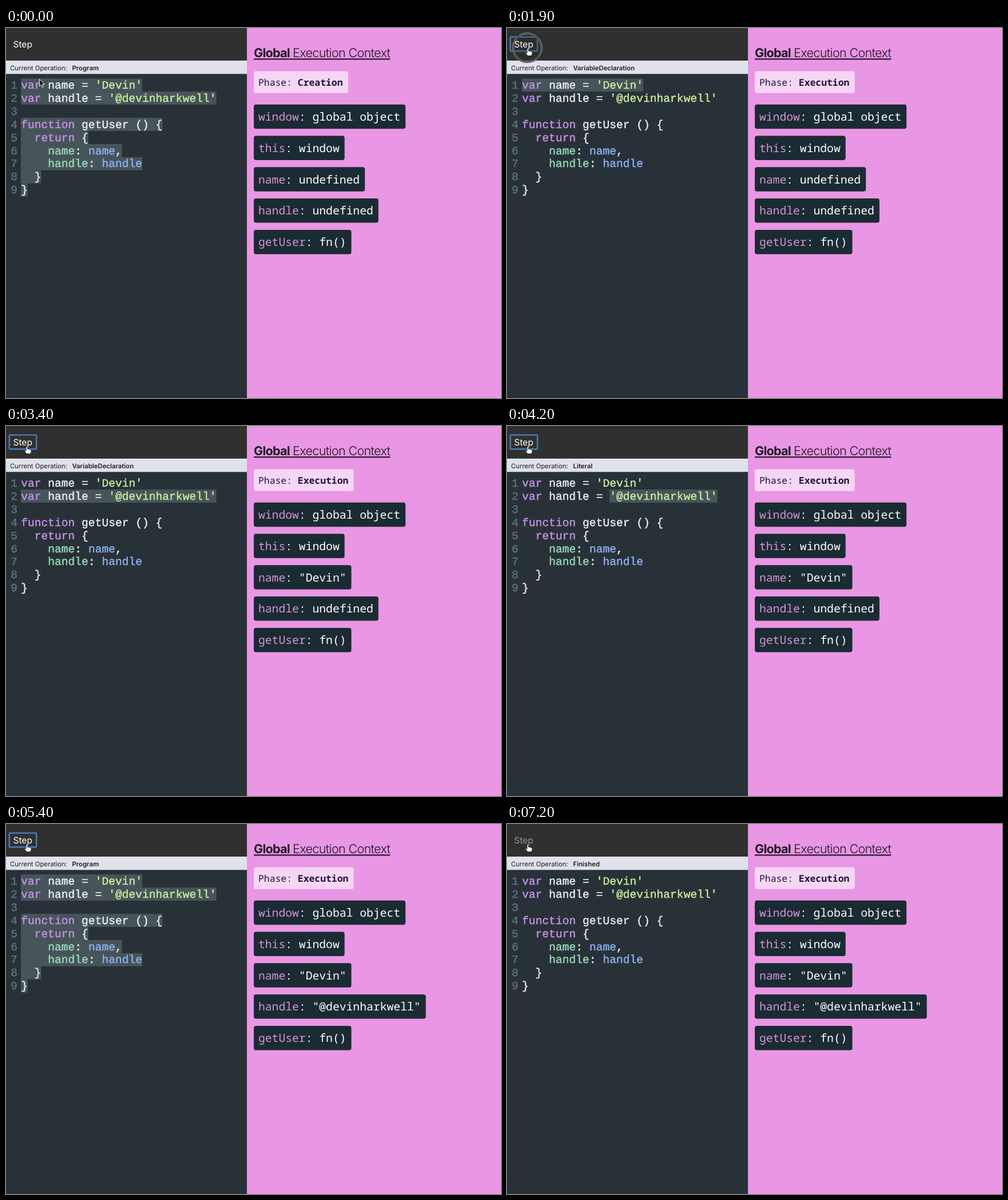
Animation, 865 px wide and 647 px high, one loop 7300 ms. Source, as an HTML page:

```html
<!DOCTYPE html>
<html lang="en">
<head>
<meta charset="utf-8">
<title>Execution context stepper</title>
<style>
  html, body { margin: 0; height: 100%; overflow: hidden; background: #293138; }
  svg { display: block; width: 865px; height: 647px; }
  text { white-space: pre; text-rendering: geometricPrecision; font-family: Inter, sans-serif; }
  .code, .code tspan { fill: currentColor; stroke: currentColor; stroke-width: .4px; }
  .code { font: 19.63px "Liberation Mono", monospace; color: #edf1f0; }
  .num { color: #5d757c; }
  .kw { color: #c792ea; }
  .str { color: #cdee9c; }
  .prop { color: #98dcb8; }
  .ref { color: #8db2f2; }
  .mono { font: 500 19.7px "Noto Sans Mono", monospace; fill: #fff; }
  .key { fill: #d494d3; }
  .phase { font-size: 16.4px; font-weight: 400; fill: #1b1736; }
  .bold { font-weight: 600; }
  .op { font-size: 11.35px; fill: #1c1c1e; }
  .title { font-size: 21.5px; font-weight: 350; letter-spacing: -.03em; fill: #1d1524; text-decoration: underline; text-decoration-thickness: 1.4px; text-underline-offset: 1.4px; }
  .title .bold { font-weight: 700; letter-spacing: -.035em; }
</style>
</head>
<body>
<svg viewBox="0 0 865 647">
  <rect width="421" height="647" fill="#293138"/>
  <rect width="421" height="57" fill="#303030"/>
  <rect y="57" width="421" height="23.3" fill="#dfe2eb"/>
  <rect x="421" width="444" height="647" fill="#e996e4"/>
  <text class="title" x="433" y="51.3"><tspan class="bold">Global</tspan> Execution Context</text>
  <text class="op" x="7" y="74">Current Operation:</text>
  <g id="state"></g>
  <g id="code"></g>
  <rect id="focus" x="5.8" y="15.8" width="47.4" height="24.6" rx="2" fill="none" stroke="#4678b2" stroke-width="2.6"/>
  <g id="press" fill="none">
    <circle cx="35.5" cy="34.5" r="25" fill="#222" fill-opacity=".2" stroke="#222" stroke-width="3.6"/>
    <circle cx="35.5" cy="34.5" r="25.8" stroke="#bbb"/>
    <circle cx="35.5" cy="34.5" r="23.6" stroke="#999" stroke-width=".8"/>
  </g>
  <text id="step" x="12.5" y="34" font-size="15.5">Step</text>
  <g id="cursor" stroke-linejoin="round">
    <path id="arrow" d="M0 0V12.5L2.9 9.8 4.9 14.2 7 13.2 5.1 9H9Z" fill="#111" stroke="#fff"/>
    <path id="hand" d="M-1.5 1.2Q0 -1 1.3 1.2V5.2Q2.7 4.2 3.6 5.7 5 4.9 5.8 6.3 7.4 5.8 7.6 7.5V10.2L6 13.5H-.3L-3.8 9Q-4.6 7.2 -2.9 7.2L-1.5 8.5Z" fill="#fff" stroke="#222"/>
  </g>
</svg>
<script>
const LOOP = 7300, PRESS = 200;
const NAME = 'Devin', HANDLE = '@devinharkwell';
const CHAR = 11.78, ROW = 22.94;
const $ = id => document.getElementById(id);
const span = (cls, s) => `<tspan class="${cls}">${s}</tspan>`;

const lines = [
  `${span('kw', 'var')} name = ${span('str', `'${NAME}'`)}`,
  `${span('kw', 'var')} handle = ${span('str', `'${HANDLE}'`)}`,
  '',
  `${span('kw', 'function')} getUser () {`,
  `  ${span('kw', 'return')} {`,
  `    ${span('prop', 'name')}: ${span('ref', 'name')},`,
  `    ${span('prop', 'handle')}: ${span('ref', 'handle')}`,
  '  }',
  '}'
];
const lengths = lines.map(s => s.replace(/<[^>]*>/g, '').length);
$('code').innerHTML = lines.map((s, i) => {
  const y = 105.8 + i * ROW;
  return `<text class="code num" x="8.3" y="${y}">${i + 1}</text><text class="code" x="26.2" y="${y}">${s}</text>`;
}).join('');

// Highlights are [row, first column]
const all = lengths.map((_, i) => [i, 0]);
const DECL = 'VariableDeclaration';
const steps = [
  { at: 0, op: 'Program', marks: all },
  { at: 1500, op: DECL, marks: [[0, 0]] },
  { at: 2100, op: 'Literal', marks: [[0, 11]] },
  { at: 2750, op: DECL, marks: [[0, 0]] },
  { at: 3350, op: DECL, marks: [[1, 0]] },
  { at: 3950, op: 'Literal', marks: [[1, 13]] },
  { at: 4550, op: DECL, marks: [[1, 0]] },
  { at: 5150, op: 'Program', marks: all },
  { at: 6700, op: 'Finished', marks: [] }
];

function label(x, y, w, h, fill, cls, textY, body) {
  return `<rect x="${x}" y="${y}" width="${w}" height="${h}" rx="4" fill="${fill}"/>` +
    `<text class="mono ${cls}" x="${x + 8}" y="${textY}">${body}</text>`;
}

function renderStep(n) {
  const { op, marks } = steps[n];
  const phase = n ? 'Execution' : 'Creation';
  const scope = [
    ['window', 'global object'],
    ['this', 'window'],
    ['name', n < 3 ? 'undefined' : `"${NAME}"`],
    ['handle', n < 6 ? 'undefined' : `"${HANDLE}"`],
    ['getUser', 'fn()']
  ];
  $('state').innerHTML =
    `<text class="op bold" x="115.5" y="74">${op}</text>` +
    marks.map(([row, col]) => `<rect x="${26 + col * CHAR}" y="${88.2 + row * ROW}"
      width="${(lengths[row] - col) * CHAR}" height="${ROW}" fill="#47545a"/>`).join('') +
    label(433, 75.5, (7 + phase.length) * 9.84 + 17.3, 38.2, '#f7d5f5', 'phase', 101, 'Phase: ' + span('bold', phase)) +
    scope.map(([key, value], i) => {
      const y = 133.7 + i * 54.8;
      return label(433, y, (key.length + value.length + 2) * 11.83 + 16.7, 42.5, '#1b2b33', '', y + 28.3, `${span('key', key)}: ${value}`);
    }).join('');
  $('step').setAttribute('fill', n === steps.length - 1 ? '#91979c' : '#fff');
}

const show = (id, on) => $(id).style.display = on ? '' : 'none';
let current = -1;

function draw(now) {
  const t = now % LOOP;
  const n = steps.findLastIndex(s => t >= s.at);
  if (n !== current) renderStep(current = n);

  const p = Math.min(1, Math.max(0, (t - 150) / 800));
  const ease = p * p * (3 - 2 * p);
  const x = 58.5 - 22 * ease, y = 89.5 - 54.3 * ease;
  $('cursor').setAttribute('transform', `translate(${x} ${y})`);
  show('hand', y < 42);
  show('arrow', y >= 42);
  show('focus', t >= steps[1].at - PRESS && n < steps.length - 1);
  show('press', steps.some(s => s.at && t >= s.at - PRESS && t < s.at));
  requestAnimationFrame(draw);
}
requestAnimationFrame(draw);
</script>
</body>
</html>
```
